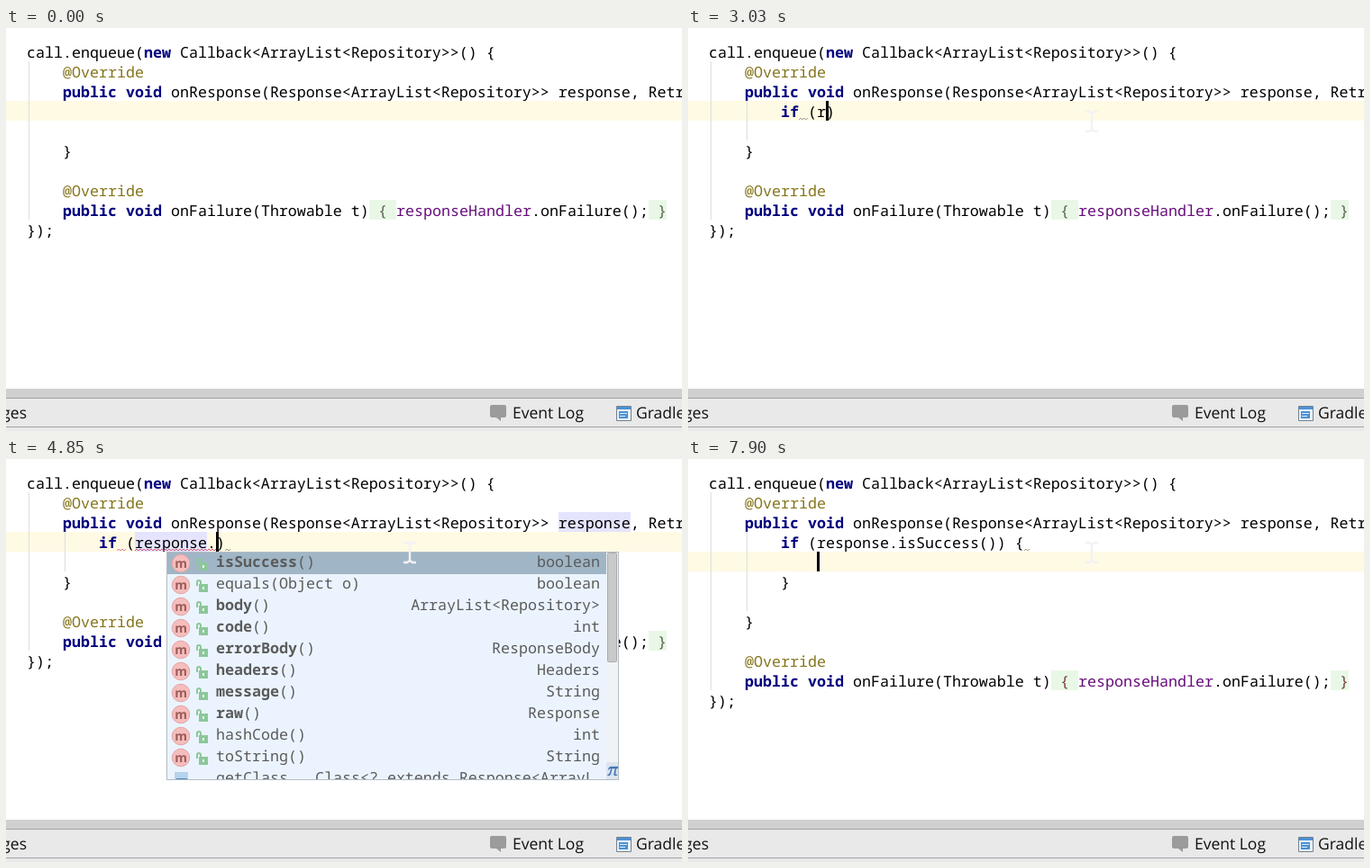
Write an HTML page that moves like this. It is 750 px wide and 448 px high and loops after 8 s.

```html
<!DOCTYPE html>
<html lang="en">
<head>
<meta charset="utf-8">
<title>Code completion</title>
<style>
  html, body { margin: 0; width: 100%; height: 100%; overflow: hidden; background: #fff; }
  svg { display: block; }
  text { white-space: pre; text-rendering: geometricPrecision;
         font: 16.667px "Noto Sans Mono", "DejaVu Sans Mono", monospace; }
  .k { fill: #000080; font-weight: 700; }
  .a { fill: #85751c; }
  .f { fill: #660e7a; }
  .row { fill: #5b5b5b; }
  .b { font-weight: 700; }
  .hit { fill: #c25fd4; }
  .ico { font: 700 14px "Noto Sans", sans-serif; fill: #9a5c58; text-anchor: middle; }
  .bar { font: 17.5px "Open Sans", "Noto Sans", sans-serif; fill: #111; }
  .pi { font: italic 700 19px "Noto Serif", serif; fill: #4478b8; }
  .end { text-anchor: end; }
</style>
</head>
<body>
<svg width="750" height="448" viewBox="0 0 750 448">
  <g id="live"></g>
  <g>
    <path fill="#d0d0d0" d="M0 401H750V411H0Z"/>
    <path fill="#e9e9e9" d="M0 411H750V448H0Z"/>
    <path stroke="#a3a3a3" d="M0 411.5H750M0 443.5H750"/>
    <text class="bar end" x="23" y="434">ges</text>
    <path fill="#9b9b9b" d="M539 419H553Q555 419 555 421V431Q555 433 553 433H549V437L544 433H539Q537 433 537 431V421Q537 419 539 419Z"/>
    <text class="bar" x="562" y="434">Event Log</text>
    <path fill="#e9f1f8" stroke="#758290" d="M677.5 420.5H693.5V436.5H677.5Z"/>
    <path fill="#4b91d4" d="M678 421H693V424H678ZM680 426H690V434H680Z"/>
    <path stroke="#dcecfa" d="M681 428.5H689M681 431.5H687"/>
    <text class="bar" x="699" y="434">Gradle</text>
  </g>
</svg>
<script>
(() => {
  const LOOP = 8000, ROW = 22, COL = 10;
  const live = document.getElementById('live');

  // Completion rows: icon and visibility | name (* = bold) | arguments | type
  const any = [
    '|*if', '|*int', 'po|retrofit||Retrofit', 'mu|*onFailure|(Throwable t)|void',
    'fo|mApiInterface||GitHubApiInterface', 'fo|mRetrofit||Retrofit', 'mu|toString|()|String',
    'mk|finalize|()|void', 'Mu|notify|()|void', 'Mu|notifyAll|()|void', 'Mu|wait|()|void'
  ];
  const response = 'po|response||Response<ArrayList<Repository>>';
  const handler = 'po|responseHandler||ResponseHandler';
  const onResponse = 'mu|*onResponse|()|void';
  const members = [
    'mu|*isSuccess|()|boolean', 'mu|equals|(Object o)|boolean', 'mu|*body|()|ArrayList<Repository>',
    'mu|*code|()|int', 'mu|*errorBody|()|ResponseBody', 'mu|*headers|()|Headers',
    'mu|*message|()|String', 'mu|*raw|()|Response', 'mu|hashCode|()|int', 'mu|toString|()|String',
    'c|getClass|   Class<? extends Response<ArrayL|'
  ];
  const popup = (x, query, rows, thumb = 0) => ({ x, query, rows, thumb });

  // Each step changes part of the state before it
  const steps = [
    [0, { pre: '', post: '' }],
    [390, { mouse: [462, 72] }],
    [660, { mouse: [448, 104] }],
    [1190, { caret: true }],
    [1950, { pre: 'i' }],
    [2030, { pre: 'if', popup: popup(48, 'i', any, 100) }],
    [2110, { popup: popup(48, 'if', [any[0], any[4], any[8], any[9]]) }],
    [2410, { pre: 'if ', popup: null }],
    [2720, { pre: 'if (', post: ')', guide: true }],
    [3030, { pre: 'if (r' }],
    [3180, { popup: popup(88, 'r', [response, any[2], handler, any[5], any[3], onResponse, any[6]]) }],
    [3410, { pre: 'if (res', popup: popup(88, 'res', [response, handler, onResponse]) }],
    [4030, { pre: 'if (response', popup: null }],
    [4340, { usage: true }],
    [4780, { pre: 'if (response.' }],
    [4850, { popup: popup(178, '', members, 121) }],
    [5200, { pre: 'if (response.is' }],
    [5280, { popup: popup(178, 'is', [members[0]]) }],
    [5660, { pre: 'if (response.isSuccess()', popup: null, parens: true }],
    [6060, { usage: false, caret: false }],
    [6600, { caret: true }],
    [7130, { caret: false }],
    [7590, { caret: true }],
    [7830, { pre: 'if (response.isSuccess()) {', post: '', parens: false }],
    [7900, { entered: true }]
  ];
  let merged = {};
  const states = steps.map(([at, change]) => merged = { ...merged, ...change, at });

  const esc = s => s.replace(/&/g, '&amp;').replace(/</g, '&lt;');
  const rect = (x, y, w, h, fill) => `<rect x="${x}" y="${y}" width="${w}" height="${h}" fill="${fill}"/>`;
  const lineY = line => 15 + ROW * line;
  const wave = (x, y, w, color) =>
    `<path fill="none" stroke="${color}" d="M${x} ${y}${'l2 -2l2 2'.repeat(Math.floor(w / 4))}l2 -2"/>`;

  function code(line, x, s) {
    const body = esc(s)
      .replace(/\b(new|public|void|if)\b/g, '<tspan class="k">$1</tspan>')
      .replace(/@Override/g, '<tspan class="a">$&</tspan>')
      .replace(/responseHandler/g, '<tspan class="f">$&</tspan>');
    return `<text x="${x}" y="${lineY(line) + 18}">${body}</text>`;
  }

  function editor(s) {
    const drop = s.entered ? 2 : 0, active = s.entered ? 4 : 3;
    const text = s.pre + s.post, y = lineY(3), fail = 8 + drop;
    const caretX = s.entered ? 143 : 103 + s.pre.length * COL;
    const brace = s.entered ? '#7a3c3c' : '#59604f';
    let out = rect(0, 0, 750, 448, '#fff') + rect(0, lineY(active), 750, ROW, '#fffae3');

    out += rect(25, lineY(1), 1, ROW * (8 + drop), '#dedede');
    if (s.guide) out += rect(65, y, 1, ROW * (2 + drop), '#dedede');
    out += rect(403, lineY(fail), 30, ROW, '#e9f8e6') + rect(713, lineY(fail), 20, ROW, '#e9f8e6');
    if (s.usage) out += rect(143, y, 80, ROW, '#e4e4ff') + rect(613, lineY(2), 80, ROW, '#e4e4ff');
    if (s.parens) out += rect(323, y, 20, ROW, '#99ccff');

    out += code(0, 23, 'call.enqueue(new Callback<ArrayList<Repository>>() {')
      + code(1, 63, '@Override')
      + code(2, 63, 'public void onResponse(Response<ArrayList<Repository>> response, Retrofit retrofit) {')
      + code(3, 103, text)
      + (s.entered ? code(5, 103, '}') : '')
      + code(5 + drop, 63, '}')
      + code(7 + drop, 63, '@Override')
      + code(fail, 63, 'public void onFailure(Throwable t)')
      + `<g fill="${brace}">${code(fail, 413, '{')}${code(fail, 723, '}')}</g>`
      + code(fail, 433, 'responseHandler.onFailure();')
      + code(9 + drop, 23, '});');

    const member = text.includes('.');
    if (s.usage) {
      out += wave(123, 102, 8, '#dc8098')
        + wave(143, 102, s.pre.endsWith('.') ? 88 : 76, '#dc5c7c');
    } else if (s.post && !member) out += wave(123, 102, 8, '#a9a49a');
    if (member) out += wave(103 + text.length * COL, 102, 7, '#aa9b72');
    if (s.caret) out += rect(caretX, lineY(active), 3, ROW, '#000');
    return out;
  }

  function icons([kind, access], x, y) {
    let out = '';
    if (kind === 'c') {
      out += rect(x + 9, y - 8, 15, 18, '#b5d3ec') + rect(x + 11, y - 1, 12, 10, '#4f86b8')
        + `<text class="ico" style="font-size:9px;fill:#fff" x="${x + 17}" y="${y + 7}">01</text>`;
    } else if (kind) {
      const method = kind.toLowerCase() === 'm';
      out += `<circle cx="${x + 16}" cy="${y}" r="9.8" fill="${method ? '#f6bdbd' : '#f4d09b'}" stroke="${method ? '#e3a5a5' : '#dfb67c'}"/>`
        + `<text class="ico" x="${x + 16}" y="${y + 5}">${kind.toLowerCase()}</text>`;
      if (kind === 'M') out += `<path fill="#736e6e" d="M${x + 4} ${y - 7}l4 -4 5 5 -4 3z"/>`;
    }
    const at = `transform="translate(${x + 39} ${y})"`;
    if (access === 'o') out += `<circle ${at} r="3.2" cy="1" fill="#f4f4f4" stroke="#a0a0a0" stroke-width="1.6"/>`;
    if (access === 'u') out += `<g ${at}><path fill="none" stroke="#8cc79a" stroke-width="2" d="M-5 1V-3Q-5 -5 -3 -5T-1 -3V0"/>`
      + `<path fill="#8cc79a" d="M-3 -1H7V8H-3Z"/><path stroke="#e8f6ea" stroke-width="2" d="M2 2V5"/></g>`;
    if (access === 'k') out += `<g ${at} fill="none" stroke="#999"><circle cy="-3" r="4" stroke-width="2.5"/>`
      + `<path stroke-width="2" d="M0 1V9M0 5H4M0 8H4"/></g>`;
    return out;
  }

  function label(name, query) {
    const i = query ? name.toLowerCase().indexOf(query) : -1;
    if (i < 0) return name;
    const end = i + query.length;
    return `${name.slice(0, i)}<tspan class="hit">${name.slice(i, end)}</tspan>${name.slice(end)}`;
  }

  function list({ x, query, rows, thumb }) {
    const h = Math.min(254, rows.length * 24 + 2), bottom = 103 + h;
    let out = rect(x, 103, 502, h, '#ebf4fe') + rect(x, 104, thumb ? 488 : 502, 24, '#a0b6c6');
    rows.forEach((row, i) => {
      const [icon, name, args = '', type = ''] = row.split('|');
      const y = 104 + 24 * i, bold = name[0] === '*';
      out += icons(icon, x, y + 12)
        + `<text class="row" x="${x + 55}" y="${y + 16}"><tspan class="${bold ? 'b' : ''}">`
        + `${label(name.replace('*', ''), query)}</tspan>${esc(args)}</text>`
        + `<text class="row end" x="${x + 481}" y="${y + 16}">${esc(type)}</text>`;
    });
    if (thumb) out += rect(x + 488, 104, 13, h - 2, '#f0f3f6')
      + `<rect x="${x + 489.5}" y="104.5" width="10" height="${thumb}" rx="1" fill="#c9c9c9" stroke="#aaa"/>`;
    out += rect(x + 488, bottom - 20, 13, 19, '#dce4ec')
      + `<text class="pi" x="${x + 489}" y="${bottom - 5}">π</text>`;
    return `<clipPath id="box"><rect x="${x}" y="103" width="502" height="${h}"/></clipPath>`
      + `<g clip-path="url(#box)">${out}</g>`
      + `<rect x="${x + .5}" y="103.5" width="501" height="${h - 1}" fill="none" stroke="#b3bcc5"/>`;
  }

  const beam = ([x, y]) => `<path transform="translate(${x} ${y})" fill="none" stroke="#f2f2f6" stroke-width="2.4"
    d="M-7 -11H-3L0 -9L3 -11H7M0 -9V9M-7 11H-3L0 9L3 11H7"/>`;

  const start = performance.now();
  let shown;
  function tick() {
    const t = (performance.now() - start) % LOOP;
    const s = states.findLast(s => s.at <= t);
    if (s !== shown) {
      shown = s;
      live.innerHTML = editor(s) + (s.popup ? list(s.popup) : '') + (s.mouse ? beam(s.mouse) : '');
    }
    requestAnimationFrame(tick);
  }
  tick();
})();
</script>
</body>
</html>
```
